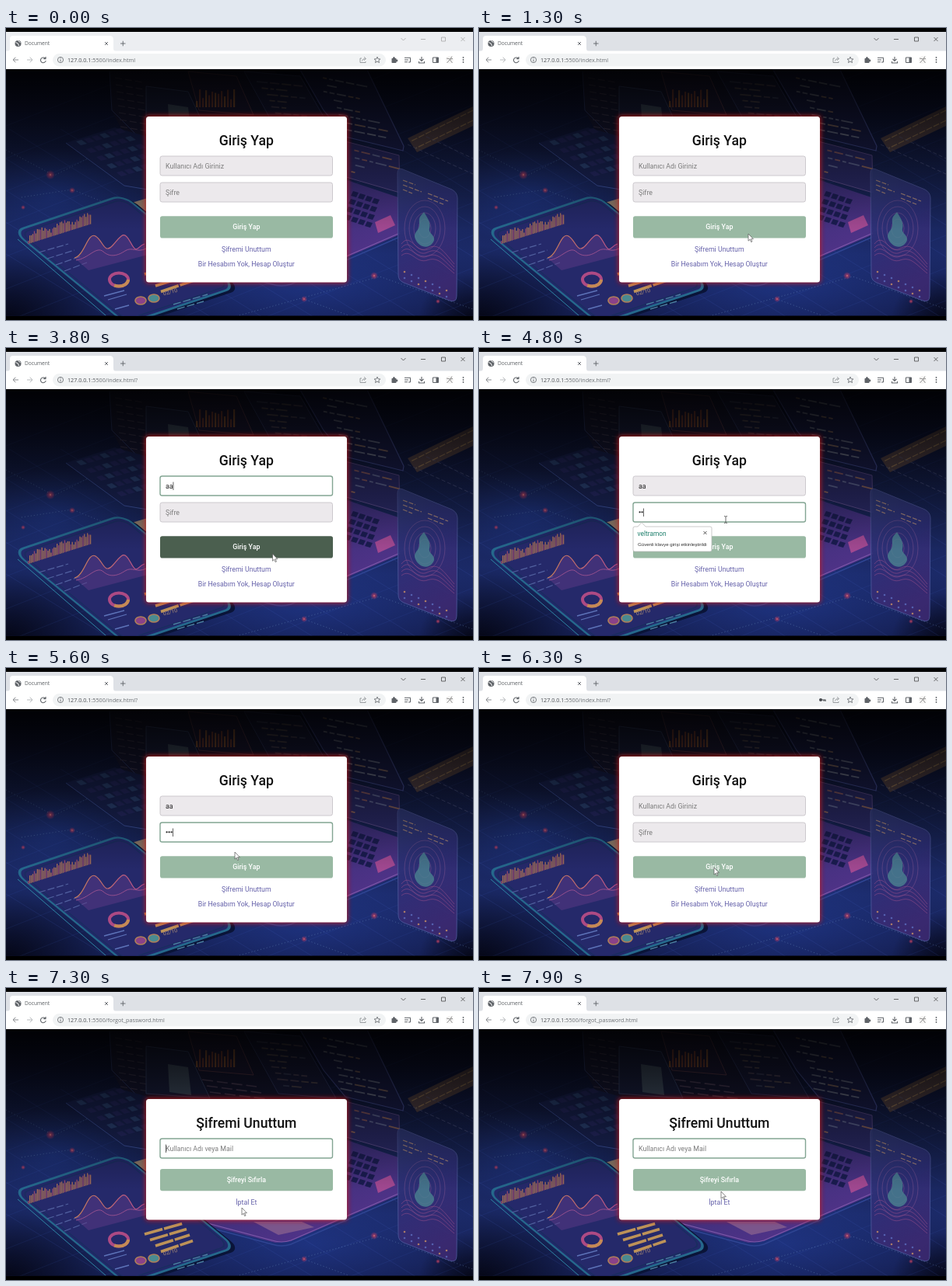
Write an HTML page that moves like this. It is 600 px wide and 376 px high and loops after 8 s.

```html
<!DOCTYPE html>
<html lang="tr">
<head>
<meta charset="utf-8">
<title>Document</title>
<style>
html, body { margin: 0; width: 100%; height: 100%; overflow: hidden; background: #000; }
svg { display: block; }
text { font-family: Roboto, sans-serif; font-size: 8.8px; white-space: pre; }
.ui { font-family: "Open Sans", sans-serif; }
</style>
</head>
<body>
<svg width="600" height="376" viewBox="0 0 600 376">
  <defs>
    <linearGradient id="night" x2="0" y2="1">
      <stop offset="0" stop-color="#0c1030"/><stop offset=".4" stop-color="#16214f"/>
      <stop offset=".75" stop-color="#1b2a68"/><stop offset="1" stop-color="#151f52"/>
    </linearGradient>
    <linearGradient id="shade" x2="0" y2="1">
      <stop offset="0" stop-opacity=".9"/><stop offset=".16" stop-opacity=".7"/>
      <stop offset=".4" stop-opacity=".36"/><stop offset=".65" stop-opacity="0"/>
    </linearGradient>
    <radialGradient id="dusk"><stop stop-color="#03040f" stop-opacity=".9"/><stop offset="1" stop-color="#03040f" stop-opacity="0"/></radialGradient>
    <radialGradient id="floor"><stop stop-color="#2440a0" stop-opacity=".5"/><stop offset="1" stop-color="#2440a0" stop-opacity="0"/></radialGradient>
    <radialGradient id="spark"><stop stop-color="#f09a8a"/><stop offset=".25" stop-color="#c04060" stop-opacity=".7"/><stop offset="1" stop-color="#c03060" stop-opacity="0"/></radialGradient>
    <linearGradient id="slab" x2=".3" y2="1"><stop stop-color="#343f80"/><stop offset=".5" stop-color="#2f3078"/><stop offset="1" stop-color="#3d2a72"/></linearGradient>
    <linearGradient id="deck" x2="1" y2="1"><stop stop-color="#222a68"/><stop offset="1" stop-color="#5c3590"/></linearGradient>
    <linearGradient id="hot" x2="1" y2="0"><stop stop-color="#c98058"/><stop offset="1" stop-color="#b8508c"/></linearGradient>
    <filter id="soft" x="-20%" y="-20%" width="140%" height="140%"><feGaussianBlur stdDeviation="3.4"/></filter>
    <clipPath id="page"><rect y="53" width="600" height="317.5"/></clipPath>
  </defs>
  <g id="back" clip-path="url(#page)"></g>
  <g id="view"></g>
</svg>
<script>
const $ = id => document.getElementById(id);
const range = (n, f) => Array.from({length: n}, (_, i) => f(i)).join('');
const path = (d, stroke, w = 1, more = '') => `<path d="${d}" fill="none" stroke="${stroke}" stroke-width="${w}" ${more}/>`;
const shape = (d, fill, more = '') => `<path d="${d}" fill="${fill}" ${more}/>`;
const rect = (x, y, w, h, fill, more = '') => `<rect x="${x}" y="${y}" width="${w}" height="${h}" fill="${fill}" ${more}/>`;
const disc = (x, y, r, fill, more = '') => `<circle cx="${x}" cy="${y}" r="${r}" fill="${fill}" ${more}/>`;
const oval = (x, y, rx, ry, fill, more = '') => `<ellipse cx="${x}" cy="${y}" rx="${rx}" ry="${ry}" fill="${fill}" ${more}/>`;
const text = (s, x, y, fill, more = '') => `<text x="${x}" y="${y}" fill="${fill}" ${more}>${s}</text>`;
const mid = 'text-anchor="middle"';

let seed = 7;
const rnd = () => (seed = seed * 16807 % 2147483647) / 2147483647;

// Rows of short dashes that look like code, slanted by dx, dy per row
function codeRows(x, y, rows, width, slope, dx, dy, colors) {
  return range(rows, r => {
    let out = '', p = rnd() * width * .2;
    while (p < width - 4) {
      const w = 4 + rnd() * 11, a = x + r * dx + p, b = y + r * dy + p * slope;
      out += path(`M${a} ${b}l${w} ${w * slope}`, colors[Math.floor(rnd() * colors.length)], 1.8, 'opacity=".75"');
      p += w + 3;
      if (rnd() < .15) break;
    }
    return out;
  });
}

const spark = (x, y, r) => disc(x, y, r, 'url(#spark)');
const dots = d => path(d, '#7fa8d0', .8, 'stroke-dasharray="1 3" opacity=".5"');

function floorArt() {
  return rect(0, 53, 600, 318, 'url(#night)')
    + oval(390, 330, 200, 80, 'url(#floor)') + oval(60, 215, 120, 60, 'url(#floor)')
    + oval(0, 375, 130, 95, 'url(#dusk)') + oval(600, 375, 70, 60, 'url(#dusk)')
    + range(13, i => path(`M${-260 + i * 66} 130l420 260`, '#4a68c8', .6, 'opacity=".25"'))
    + range(12, i => path(`M-10 ${130 + i * 42}l620 -245`, '#4a68c8', .6, 'opacity=".2"'))
    + dots('M0 157L62 190 140 150') + dots('M20 218L85 208 178 245')
    + dots('M300 370L480 320 600 362') + dots('M385 350L440 370')
    + spark(57, 189, 6) + spark(85, 209, 4) + spark(473, 319, 5) + spark(383, 349, 4) + spark(555, 352, 3) + spark(22, 231, 3);
}

function laptopArt() {
  const pale = ['#9aa0b0', '#b08a70', '#8a90a8'], warm = ['#b07a58', '#a86a60', '#7078a0'];
  return shape('M133 56L345 54 440 200 178 190 136 106z', '#1b1c3c')
    + path('M133 56L136 106 180 150', '#34407a', 1)
    + range(9, i => path(`M${140 + i} ${64 + i * 9}l36 6`, '#453f5a', 1.2, 'stroke-dasharray="9 4"'))
    // keyboard on the left
    + shape('M77 148L140 128 182 140V205L152 202z', '#1a2456')
    + range(5, r => range(6, c => shape(`M${90 + c * 10 + r * 13} ${146 - c * 3 + r * 10}l7 -2 7 5 -8 2z`, (r + c) % 3 ? '#262a66' : '#2c4478')))
    + path('M77 148L152 203 182 208', '#3c4f98', 1)
    + shape('M158 226L182 219V236L166 234z', '#8a7868')
    // floating chart panes
    + shape('M180 75L234 82 262 142 180 136z', '#20264c', 'stroke="#42507f" stroke-width="1"')
    + shape('M208 98L234 102 238 138 210 134z', '#4d5d74')
    + shape('M234 56L296 62 318 112 248 106z', '#241f42', 'stroke="#6a4458" stroke-width="1"')
    + range(13, i => {
      const h = 8 + 15 * Math.abs(Math.sin(i * 1.7));
      return rect(244 + i * 4, 102 - h, 2.2, h, i % 3 ? '#8f4a3e' : '#a8683f');
    })
    + path('M252 118l70 9M258 126l70 9M262 134l74 9', '#5a4a68', 1.6, 'stroke-dasharray="14 5"')
    + shape('M306 56L378 62 424 142 350 136z', '#1e2148', 'stroke="#3a4378" stroke-width="1"')
    + codeRows(322, 69, 8, 52, .1, 4, 8, ['#50567a', '#6c5c70', '#7a6a68'])
    // code windows on the right
    + shape('M378 54L464 54 511 152 510 158 436 140 408 106z', '#1c2050', 'stroke="#454f98" stroke-width="1.2"')
    + codeRows(396, 62, 8, 68, .2, 4.2, 9.5, pale)
    + shape('M436 146L505 164 506 212 437 192z', '#2a2a66', 'stroke="#5a4a88" stroke-width="1"')
    + codeRows(442, 156, 4, 56, .25, 0, 9.5, warm)
    // lit laptop deck
    + shape('M438 196L504 218 506 266 366 326 346 328 180 286 180 250z', 'url(#deck)')
    + range(4, r => range(4, c => shape(`M${446 + c * 9 - r * 3} ${210 + c * 3 + r * 10}l7 2 -3 6 -7 -2z`, '#1a1c50')))
    + shape('M474 250L494 241 500 254 478 264z', '#a04890')
    + shape('M318 301L380 301 396 308 350 318z', '#87608f', 'opacity=".8"')
    + path('M180 282L342 325Q354 329 366 325L506 264', '#7d58a8', 1.2)
    + path('M180 287L342 330Q354 334 366 330L506 269', '#2e4492', 1.6);
}

function tabletArt() {
  return '<g transform="matrix(1.4 -.47 1.46 1.2 10 262)">'
    + rect(2, 2, 100, 100, '#0a1438', 'rx="9"')
    + rect(0, 0, 100, 99, '#22296a', 'rx="9" stroke="#25688c" stroke-width="1.8"')
    + rect(3, 3, 94, 93, '#25296a', 'rx="7" stroke="#1a2c60" stroke-width="1"') + '</g>'
    + path('M15 272L128 370', '#2f86a4', 1)
    + range(42, i => {
      const h = 4 + 7 * Math.abs(Math.sin(i * .21)) + 5 * Math.abs(Math.sin(i * 1.9));
      return rect(28 + i * 1.95, 278 - i * .62 - h, 1.3, h, i % 4 ? '#a87058' : '#944a6c');
    })
    + range(4, i => path(`M${42 + i * 11} ${289 + i * 8}l${38 - i * 3} -11`, '#51609f', 1.2, 'stroke-dasharray="9 3"'))
    + shape('M88 296C101 293 105 262 115 268S126 292 137 280 151 259 160 276 168 281 178 278L182 292 106 312z', '#5f3a86', 'opacity=".5"')
    + path('M88 296C101 293 105 262 115 268S126 292 137 280 151 259 160 276 168 281 178 278', 'url(#hot)', 1.2)
    + path('M90 299C106 297 116 280 125 288S144 293 153 287 168 290 180 284', '#96508e', 1)
    + oval(145, 324, 12, 8.5, 'none', 'stroke="#ad4a84" stroke-width="4"')
    + oval(145, 324, 12, 8.5, 'none', 'stroke="#c48a55" stroke-width="4" stroke-dasharray="22 60"')
    + oval(173, 351, 7, 5, '#8a4288', 'stroke="#b08058" stroke-width="1.6"')
    + oval(190, 348, 7, 5, '#4a8a90', 'stroke="#b08058" stroke-width="1.6"')
    + range(4, i => path(`M${178 + i * 7} ${317 + i * 7.5}l${50 - i * 3} -14`, '#bd9258', 3.6, 'stroke-dasharray="24 2"'))
    + path('M126 345l26 -7M131 350l24 -7M140 362l18 -5', '#5d73b8', 1.3)
    + '<g transform="rotate(-15 204 342)">' + text('02/10', 202, 344, '#b09078', 'style="font-size:7px"') + '</g>'
    + path('M215 356l44 -13M220 362l34 -10', '#4c7fa0', 1.4, 'stroke-dasharray="10 3"');
}

function phoneArt() {
  return shape('M600 101L516 142 528 160 600 126z', '#6a5148', 'opacity=".75"')
    + path('M600 106L520 146M600 119L526 155', '#9a7a58', 1.2, 'stroke-dasharray="8 2"')
    + path('M516 150L600 188M540 140L600 168', '#5c6390', 1, 'stroke-dasharray="5 3" opacity=".6"')
    + shape('M503 187Q503 179 510 182L573 208Q580 212 580 219L579 345Q579 354 570 351L511 328Q504 325 504 318z', 'url(#slab)', 'opacity=".9" stroke="#4c5598" stroke-width="1"')
    + path('M510 196l16 6M510 202l24 9M510 208l12 5M542 213l26 10M542 219l20 8', '#a08078', 1.2, 'stroke-dasharray="6 2"')
    + range(4, i => oval(538, 258, 8 + i * 6, 12 + i * 8, 'none', 'stroke="#8a5a94" stroke-width=".8" opacity=".55"'))
    + shape('M537 237C542 245 546 251 544 258S555 268 548 277 530 281 526 272 532 261 531 252 533 242 537 237z', '#4a8290', 'opacity=".8"')
    + range(4, i => path(`M508 ${278 + i * 5}C520 ${262 + i * 7} 527 ${292 + i * 4} 541 ${284 + i * 5}S561 ${286 + i * 6} 576 ${304 + i * 4}`, '#8e4c88', .9, 'opacity=".7"'))
    + range(14, i => disc(512 + i % 7 * 9, 314 + i % 7 * 4 + Math.floor(i / 7) * 8, 1.3, i % 3 ? '#545fae' : '#a87a68'));
}

$('back').innerHTML = floorArt() + laptopArt() + tabletArt() + phoneArt() + rect(0, 53, 600, 318, 'url(#shade)');

function chrome(url, active, key) {
  const ink = '#5f6368', win = active ? '#4a4a4a' : '#a8a8a8';
  return rect(0, 5, 600, 25, active ? '#dee1e6' : '#eceef1')
    + shape('M2 30Q5 30 5 26V14Q5 10 9 10H133Q138 10 138 15V26Q138 30 141 30z', '#fff')
    + rect(0, 29.5, 600, 23.5, '#fff')
    + disc(15.5, 20, 4, ink) + path('M12.5 18.5l3 1.5 1 3M15.5 16.5l3 2', '#fff', 1)
    + text('Document', 24, 22.4, '#5a5e62', 'class="ui" style="font-size:6.6px"')
    + path('M127 18l4 4m0-4l-4 4M147 20h6.5m-3.25-3.25v6.5', ink, .9)
    + path('M507.5 13l3 3 3-3M533 14.5h6M559.5 12h5v5h-5zM584.5 12l5 5m0-5l-5 5', win, .8)
    + path('M16 41H9m3.3-3.3L9 41l3.3 3.3', '#8b8e92', 1) + path('M27 41h7m-3.3-3.3L34 41l-3.3 3.3', '#b8bbbe', 1)
    + path('M50.3 39A3.4 3.4 0 1 0 51.2 42M51 37v2.6h-2.7', ink, 1.1)
    + rect(60, 33, 428, 16.5, '#f1f3f4', 'rx="8.2"')
    + path('M70 40.5v2.7M70 38.4v1', ink, .9) + `<circle cx="70" cy="41" r="3.6" fill="none" stroke="${ink}" stroke-width=".8"/>`
    + text(`<tspan fill="#4a4d52">127.0.0.1</tspan>:5500/${url}`, 79, 43.7, '#6c7074', 'class="ui" style="font-size:7.2px"')
    + (key ? disc(439, 41, 2, '#45494d') + path('M440 41h5v2M443 41v1.7', '#45494d', 1.2) : '')
    + path('M457 39h-2v5.5h7V43M457.5 42.5q.5-3 4-3M460 37.3l2.5 2.2-2.5 2.2', '#85888c', .8)
    + path('M477 37.2l1.1 2.6 2.8.2-2.1 1.8.7 2.8-2.5-1.5-2.5 1.5.7-2.8-2.1-1.8 2.8-.2z', ink, .8)
    + rect(495.5, 39, 6, 6, ink, 'rx=".8"') + disc(498.4, 38.6, 1.4, ink) + disc(502, 42, 1.4, ink)
    + path('M512 38.3h8M512 41h5M512 43.7h4M519.5 39v5M517 44h2.5', ink, 1.1)
    + path('M534 37v5.5m-2.6-2.6l2.6 2.6 2.6-2.6M530.5 43v2h7v-2', ink, 1.1)
    + path('M548.5 38h7v6.5h-7z', ink, 1) + rect(552.5, 38, 3, 6.5, ink)
    + disc(570, 41, 5, '#f6f5f4') + path('M573 36.5l-2.5 4-4 4.5M570.5 41l3 4M566 39l4.5 1 3.5-.5', '#777', .8)
    + range(3, i => disc(587.5, 38 + i * 3, .9, ink));
}

function field(y, hint, value, focused, caretX) {
  return rect(198, y, 221.5, 25, focused ? '#fff' : '#ece9ec', `rx="2.6" stroke="${focused ? '#83a593' : '#c8c5c9'}" stroke-width="${focused ? 1.4 : .9}"`)
    + (value || text(hint, 205, y + 15.6, '#7c7c7c'))
    + (caretX ? rect(caretX, y + 7.5, .7, 10.5, '#222') : '');
}

const card = (y, h, title) => rect(179, y - 1, 260, h + 2, '#c81a1a', 'rx="4" filter="url(#soft)" opacity=".85"')
  + rect(180, y, 258, h, '#fff', 'rx="3.5"')
  + text(title, 308.8, y + 37.3, '#111', mid + ' font-weight="500" style="font-size:17.6px"');
const link = (s, y, under) => text(s, 308.8, y, '#6561aa', mid + (under ? ' text-decoration="underline"' : ''));

function button(y, label, dark) {
  const mix = (a, b) => Math.round(a + (b - a) * dark);
  return rect(198, y, 222, 28.3, `rgb(${mix(153, 75)},${mix(185, 95)},${mix(163, 79)})`, 'rx="2.8"')
    + text(label, 308.8, y + 17.2, '#fff', mid + ' font-weight="500"');
}

const popup = () => shape('M200 230H204L209 224.5 214 230H297Q299 230 299 232V260Q299 262 297 262H200Q198 262 198 260V232Q198 230 200 230z', '#fff', 'stroke="#b5b5b5" stroke-width=".7"')
  + text('veltramon', 203.5, 242.3, '#21806e', 'style="font-size:8.4px"')
  + path('M288.5 236l4 4m0-4l-4 4', '#444', .9)
  + text('Güvenli klavye girişi etkinleştirildi', 204, 254.8, '#333', 'style="font-family:\'Liberation Sans\',sans-serif;font-size:6.1px"');

const pointers = {
  arrow: shape('M0 0V9.2L2.1 7.2 3.6 10.6 5 10 3.5 6.7H6.4z', '#fff', 'stroke="#555" stroke-width=".7"'),
  beam: path('M-2 -4.5Q0 -4.5 0 -3.5Q0 -4.5 2 -4.5M0 -3.5V3.5M-2 4.5Q0 4.5 0 3.5Q0 4.5 2 4.5', '#444', .8),
  hand: shape('M0 0Q1.3 -1 1.6 .6V4L5.4 5Q6.4 5.3 6.2 6.5L5.5 11H.5L-2 7.4Q-2.4 6 -.2 7z', '#fff', 'stroke="#444" stroke-width=".7"')
};

// time, x, y of the pointer
const track = [
  [1300, 346, 265], [1500, 344, 264], [1700, 344, 264], [1900, 345, 272], [2300, 345, 272], [2500, 343, 265],
  [2800, 343, 265], [3100, 346, 274], [3300, 346, 274], [3600, 342.5, 265], [4500, 342.5, 265], [4800, 317, 221],
  [5200, 315, 219], [5400, 305, 226], [5600, 294, 237], [5900, 302, 256], [6300, 302, 257], [6400, 302, 258],
  [6800, 304, 283], [7000, 302.5, 284], [7300, 303, 283], [7900, 311, 262]
];
function pointer(t) {
  if (t < track[0][0]) return '';
  const i = track.findIndex(k => k[0] > t);
  const b = track[i < 0 ? track.length - 1 : i], a = i < 0 ? b : track[i - 1];
  const p = b === a ? 0 : (t - a[0]) / (b[0] - a[0]);
  const kind = t >= 4700 && t < 5400 ? 'beam' : t >= 6800 && t < 7200 ? 'hand' : 'arrow';
  return `<g transform="translate(${a[1] + (b[1] - a[1]) * p} ${a[2] + (b[2] - a[2]) * p})">${pointers[kind]}</g>`;
}

const clamp = v => Math.max(0, Math.min(1, v));
const hovers = [[1300, 1700], [2300, 2900], [3400, 4200], [5600, 6100]];
const hover = t => Math.max(...hovers.map(([a, b]) => Math.min(clamp((t - a) / 200), clamp(1 - (t - b) / 200))));
const since = (t, times) => times.filter(k => k <= t).length;
const blink = (t, start) => Math.floor((t - start) / 500) % 2 === 0;

function login(t) {
  const naming = t >= 1800 && t < 4300, secret = t >= 4300 && t < 6100;
  const letters = t < 6100 ? since(t, [3400, 3600]) : 0;
  const marks = secret ? since(t, [4600, 4800, 5200]) : 0;
  const nameStart = letters > 1 ? 3600 : letters ? 3400 : 1800;
  const secretStart = [4300, 4600, 4800, 5200][marks];
  return card(114, 213.5, 'Giriş Yap')
    + field(165, 'Kullanıcı Adı Giriniz', letters && text('a'.repeat(letters), 205, 180.6, '#222'), naming, naming && blink(t, nameStart) && 205 + letters * 4.8)
    + field(199, 'Şifre', marks && range(marks, i => disc(206.6 + i * 3, 211.3, 1.15, '#222')), secret, secret && blink(t, secretStart) && 205 + marks * 3.05)
    + button(242.2, 'Giriş Yap', hover(t))
    + link('Şifremi Unuttum', 287.8, t >= 6800) + link('Bir Hesabım Yok, Hesap Oluştur', 307)
    + (t >= 4300 && t < 5500 ? popup() : '');
}

const reset = t => card(143, 155.5, 'Şifremi Unuttum')
  + field(194, 'Kullanıcı Adı veya Mail', '', true, blink(t, 7200) && 205)
  + button(233, 'Şifreyi Sıfırla', 0) + link('İptal Et', 278.6);

let shown = -1;
function draw(now) {
  const t = Math.floor(now % 8000 / 100) * 100;
  if (t !== shown) {
    shown = t;
    const forgot = t >= 7200;
    const url = forgot ? 'forgot_password.html' : 'index.html' + (t >= 1800 ? '?' : '');
    $('view').innerHTML = (forgot ? reset(t) : login(t)) + chrome(url, t >= 100, t >= 6200 && !forgot) + pointer(t);
  }
  requestAnimationFrame(draw);
}
draw(0);
</script>
</body>
</html>
```
